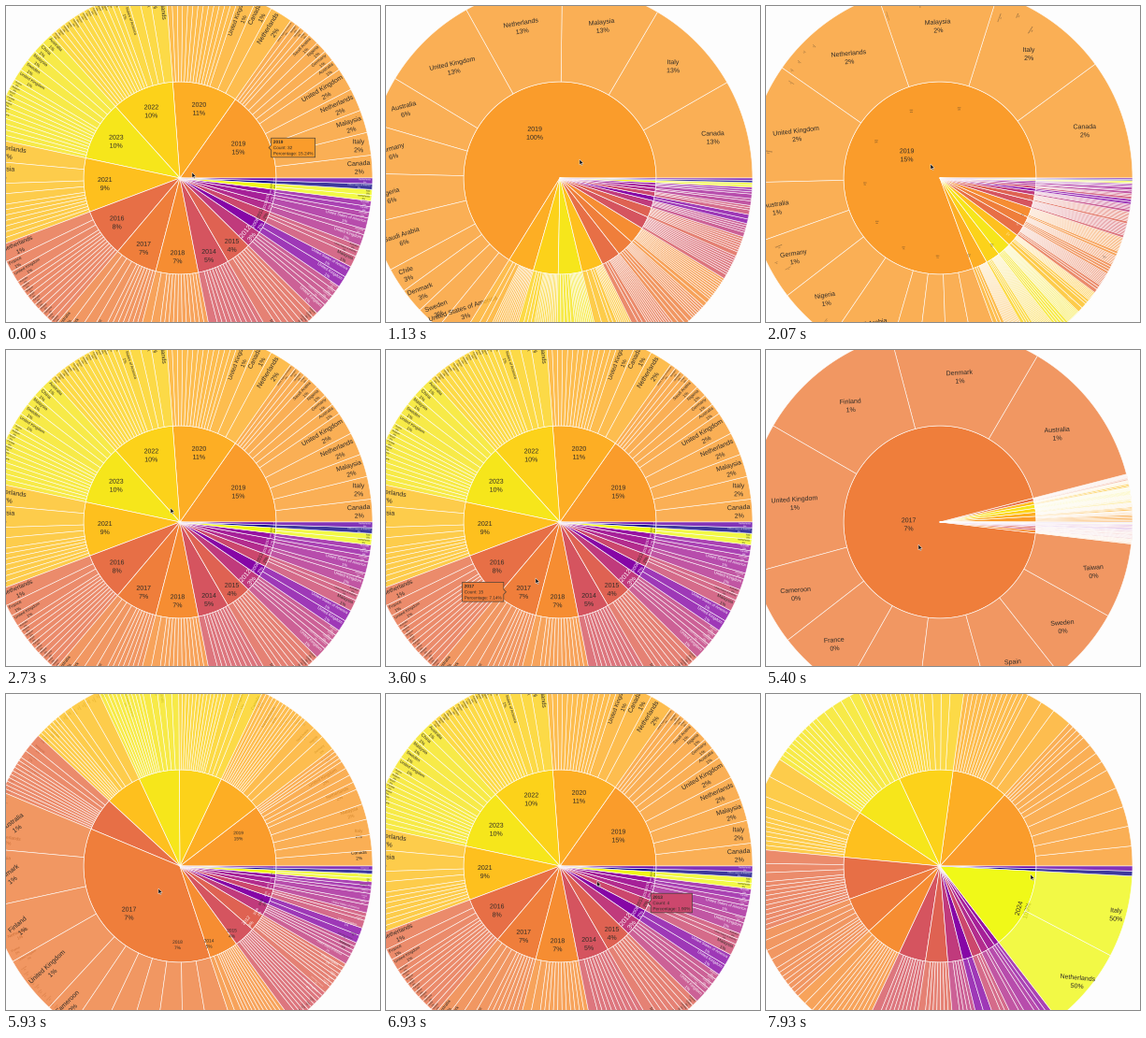
Write a matplotlib script that moves like this. It is 400 px wide and 338 px high and loops after 8 s.

```python
import math

import matplotlib.pyplot as plt
import numpy as np
from matplotlib.animation import FuncAnimation
from matplotlib.collections import PathCollection
from matplotlib.path import Path
from matplotlib.textpath import TextPath

W, H, DPI = 400, 338, 100
LOOP, FRAMES = 8000, 120
CX, CY = 186, 154          # y points up
R1, R2 = 103, 206          # inner disc and outer ring
FONT, BLOCK = 7, 17        # label size and height of a two-line label
ZOOM = 750
DARK, WHITE = (0.19, 0.17, 0.15, 1), (1, 1, 1, 1)
NONE = (0, 0, 0, 0)
LINE = 0.45

# year, entries per country (one digit each), leading country names
DATA = [
    (2019, "4444422221111", "Canada,Italy,Malaysia,Netherlands,United Kingdom,Australia,"
     "Germany,Nigeria,Saudi Arabia,Chile,Denmark,Sweden,United States of America"),
    (2020, "433" + "1" * 13, "Netherlands,Canada,United Kingdom"),
    (2022, "3222" + "1" * 13, "Netherlands,Denmark,Italy,United States of America"),
    (2023, "22222" + "1" * 11, "Australia,China,Malaysia,Sweden,United Kingdom"),
    (2021, "4422" + "1" * 7, "Netherlands,Malaysia,Canada,Spain"),
    (2016, "322" + "1" * 10, "Netherlands,France,United Kingdom"),
    (2017, "2222" + "1" * 7, "Australia,Denmark,Finland,United Kingdom,Cameroon,France,"
     "India,Italy,Spain,Sweden,Taiwan"),
    (2018, "22" + "1" * 11, "Canada,Netherlands"),
    (2014, "2" + "1" * 9, "United Kingdom"),
    (2015, "2" + "1" * 7, "Netherlands"),
    (2012, "2" + "1" * 4, "United Kingdom,United States of America"),
    (2008, "22", "United Kingdom,United States of America"),
    (2013, "211", "Malaysia,United States of America"),
    (2011, "21", "United Kingdom"),
    (2010, "21", "United States of America"),
    (2009, "11", "Canada"),
    (2024, "11", "Netherlands,Italy"),
    (2002, "1", "United States of America"),
    (2006, "1", "Netherlands"),
]
POOL = ("Australia,Austria,Belgium,Brazil,Canada,China,Finland,France,Germany,India,"
        "Ireland,Italy,Japan,Kenya,Norway,Portugal,Spain,Sweden,Taiwan,Turkey").split(",")
TOTAL = sum(int(d) for _, digits, _ in DATA for d in digits)

# start time, zooming in?, year
ZOOMS = [(616, True, 2019), (1895, False, 2019), (3840, True, 2017),
         (5353, False, 2017), (7770, True, 2024)]
HOVERS = [(0, 616), (2760, 3840), (6350, 7770)]
# time, x, y of the pointer tip, y down
POINTER = [(0, 199, 178), (330, 199, 178), (560, 207, 164), (1150, 207, 164),
           (1750, 176, 169), (2700, 176, 169), (3250, 160, 244), (3600, 160, 244),
           (3780, 157, 239), (4600, 157, 239), (5250, 163, 208), (6300, 163, 208),
           (7400, 283, 193), (8000, 283, 193)]
ARROW = np.array([(0, 0), (0, -5.8), (1.3, -4.6), (2.2, -6.6), (3.1, -6.2),
                  (2.3, -4.3), (4.1, -4.3), (0, 0)])


def year_color(year):
    x = (year - 2002) / 22
    r, g, b, _ = plt.cm.plasma(x)
    return (r, g, b * np.interp(x, [0.4, 0.7], [1, 0.72]), 1)


def build_nodes():
    years, leaves, pos = [], [], 0
    for year, digits, names in DATA:
        names = names.split(",")
        names += [n for n in POOL if n not in names]
        color = year_color(year)
        ink = WHITE if year <= 2012 else DARK
        start = pos
        for name, d in zip(names, digits):
            n = int(d)
            leaves.append(dict(name=name, year=year, n=n, a=pos, b=pos + n, leaf=True,
                               color=color[:3] + (0.8,), ink=ink))
            pos += n
        years.append(dict(name=str(year), year=year, n=pos - start, a=start, b=pos,
                          leaf=False, color=color, ink=ink))
    for node in years + leaves:
        node["a"] *= 360 / TOTAL
        node["b"] *= 360 / TOTAL
    return years, leaves


YEARS, LEAVES = build_nodes()
BY_YEAR = {y["year"]: y for y in YEARS}
cache = {}


def text_path(s, size, weight="normal"):
    key = s, size, weight
    if key not in cache:
        cache[key] = TextPath((0, 0), s, size=size,
                              prop=dict(family="Liberation Sans", weight=weight))
    return cache[key]


def label_path(name, pct):
    """Two centred lines around the origin, with their width."""
    key = name, pct
    if key not in cache:
        lines, width = [], 0
        for s, base in ((name, 2), (f"{pct}%", -7)):
            p = text_path(s, FONT)
            box = p.get_extents()
            lines.append(Path(p.vertices + (-(box.x0 + box.x1) / 2, base), p.codes))
            width = max(width, box.width)
        cache[key] = Path.make_compound_path(*lines), width
    return cache[key]


def polar(r, deg):
    a = math.radians(deg)
    return CX + r * math.cos(a), CY + r * math.sin(a)


def upright(deg):
    return (deg + 90) % 180 - 90


def wedge(a, b, r0, r1):
    t = np.radians(np.linspace(a, b, int((b - a) / 2) + 3))
    ring = np.column_stack([np.cos(t), np.sin(t)])
    if r0:
        pts = np.vstack([ring * r1, ring[::-1] * r0, ring[:1] * r1])
    elif b - a > 359.9:
        pts = ring * r1
    else:
        pts = np.vstack([ring * r1, [(0, 0)], ring[:1] * r1])
    return Path(pts + (CX, CY), closed=True)


def inscribed(span, leaf):
    s = math.sin(math.radians(min(span, 180) / 2))
    return min((R2 - R1) / 2, R2 * s / (1 + s)) if leaf else R1 * s / (1 + s)


def fit(a, b, width, leaf):
    """Radius, tilt and scale of a label inside a slice."""
    span, mid = b - a, (a + b) / 2
    if span > 359.9 and not leaf:
        return 0, 0, 1
    ri = inscribed(span, leaf)
    if 2 * ri >= math.hypot(width, BLOCK) - 0.6:
        return (R2 if leaf else R1) - ri, 0, 1
    k = 2 * math.tan(math.radians(span / 2))
    if leaf:
        s = min(1, R2 * k / (BLOCK + k * width))
        return R2 - s * width / 2 - 2, upright(mid), s
    s = min(1, R1 * k / (width + BLOCK * k))
    return R1 - s * BLOCK / 2, upright(mid + 90), s


def place(path, x, y, tilt=0, scale=1):
    c, s = (f(math.radians(tilt)) * scale for f in (math.cos, math.sin))
    return Path(path.vertices @ np.array([(c, s), (-s, c)]) + (x, y), path.codes)


def zoom_state(t):
    """Zoomed year, zoom amount, direction and progress."""
    state = None, 0, False, 1
    for start, inward, year in ZOOMS:
        if t >= start:
            u = min(1, (t - start) / ZOOM)
            state = year, (u if inward else 1 - u), inward, u
    return state


def label(node, state, warp):
    year, p, inward, u = state
    own = node["year"] == year
    if inward and not own:
        return None
    whole = BY_YEAR[year]["n"] if inward else TOTAL
    path, width = label_path(node["name"], int(100 * node["n"] / whole + 0.5))
    a, b, leaf = node["a"], node["b"], node["leaf"]
    r, tilt, s = fit(a, b, width, leaf)
    mid = (a + b) / 2
    if own and p > 0:
        wa, wb = warp(a, 1), warp(b, 1)
        far_r, far_tilt, _ = fit(wa, wb, width, leaf)
        q = p
        if not leaf:
            q = u ** 3 if inward else 1 - u ** (1 / 3)
        r += (far_r - r) * q
        tilt += (far_tilt - tilt) * p
        wa, wb = warp(a, p), warp(b, p)
        s = fit(wa, wb, width, leaf)[2]
        mid = (wa + wb) / 2
    elif not own:
        s *= u
    if s < 0.1:
        return None
    return place(path, *polar(r, mid), tilt, s)


def sunburst(state):
    year, p = state[:2]
    sa, sb = (BY_YEAR[year]["a"], BY_YEAR[year]["b"]) if year else (0, 360)

    def warp(x, k):
        if abs(x - sa) < 1e-6:
            return sa * (1 - k)
        if abs(x - sb) < 1e-6:
            return sb + (360 - sb) * k
        return float(np.interp(x, [0, sa, sb, 360], [0, sa * (1 - k), sb + (360 - sb) * k, 360]))

    items = []
    for node in YEARS + LEAVES:
        a, b = warp(node["a"], p), warp(node["b"], p)
        if b - a < 1e-3:
            continue
        radii = (R1, R2) if node["leaf"] else (0, R1)
        edge = (1, 1, 1, 0.85) if node["leaf"] else WHITE
        items.append((wedge(a, b, *radii), node["color"], edge, LINE))
        text = label(node, state, warp)
        if text is not None:
            items.append((text, node["ink"], NONE, 0))
    return items


def pointer(t):
    for (t0, x0, y0), (t1, x1, y1) in zip(POINTER, POINTER[1:]):
        if t <= t1:
            u = (t - t0) / (t1 - t0)
            u = u * u * (3 - 2 * u)
            return x0 + (x1 - x0) * u, H - y0 - (y1 - y0) * u


def tooltip(x, y):
    deg = math.degrees(math.atan2(y - CY, x - CX)) % 360
    node = next(n for n in YEARS if n["a"] <= deg <= n["b"] + 1e-6)
    ri = inscribed(node["b"] - node["a"], False)
    px, py = polar(R1 - ri, (node["a"] + node["b"]) / 2)
    side = 1 if px >= CX else -1
    lines = [text_path(node["name"], 4.7, "bold"),
             text_path(f"Count: {node['n']}", 4.7),
             text_path(f"Percentage: {100 * node['n'] / TOTAL:.2f}%", 4.7)]
    width = max(p.get_extents().x1 for p in lines) + 4.5
    tip = px + side * ri
    near = tip + side * 2.6
    far = near + side * width
    box = [(tip, py), (near, py + 2.6), (near, py + 10.3), (far, py + 10.3),
           (far, py - 10.3), (near, py - 10.3), (near, py - 2.6), (tip, py)]
    items = [(Path(box, closed=True), node["color"], (0.27, 0.25, 0.22, 1), 0.5)]
    left = min(near, far) + 2.2
    for i, p in enumerate(lines):
        items.append((place(p, left, py + 4.6 - 6.2 * i), node["ink"], NONE, 0))
    return items


fig = plt.figure(figsize=(W / DPI, H / DPI), dpi=DPI, facecolor="#fdfdfd")
ax = fig.add_axes([0, 0, 1, 1])
ax.set(xlim=(0, W), ylim=(0, H))
ax.axis("off")
chart = PathCollection([])
ax.add_collection(chart, autolim=False)


def update(i):
    t = i * LOOP / FRAMES
    items = sunburst(zoom_state(t))
    x, y = pointer(t)
    if any(t0 <= t < t1 for t0, t1 in HOVERS):
        items += tooltip(x, y)
    items.append((Path(ARROW + (x, y), closed=True), (0.05, 0.05, 0.05, 1), WHITE, 0.3))
    paths, faces, edges, widths = zip(*items)
    chart.set_paths(paths)
    chart.set_facecolor(faces)
    chart.set_edgecolor(edges)
    chart.set_linewidth(widths)
    return [chart]


anim = FuncAnimation(fig, update, frames=FRAMES, interval=LOOP / FRAMES,
                     init_func=lambda: update(0), repeat=True, repeat_delay=0)
plt.show()
```
